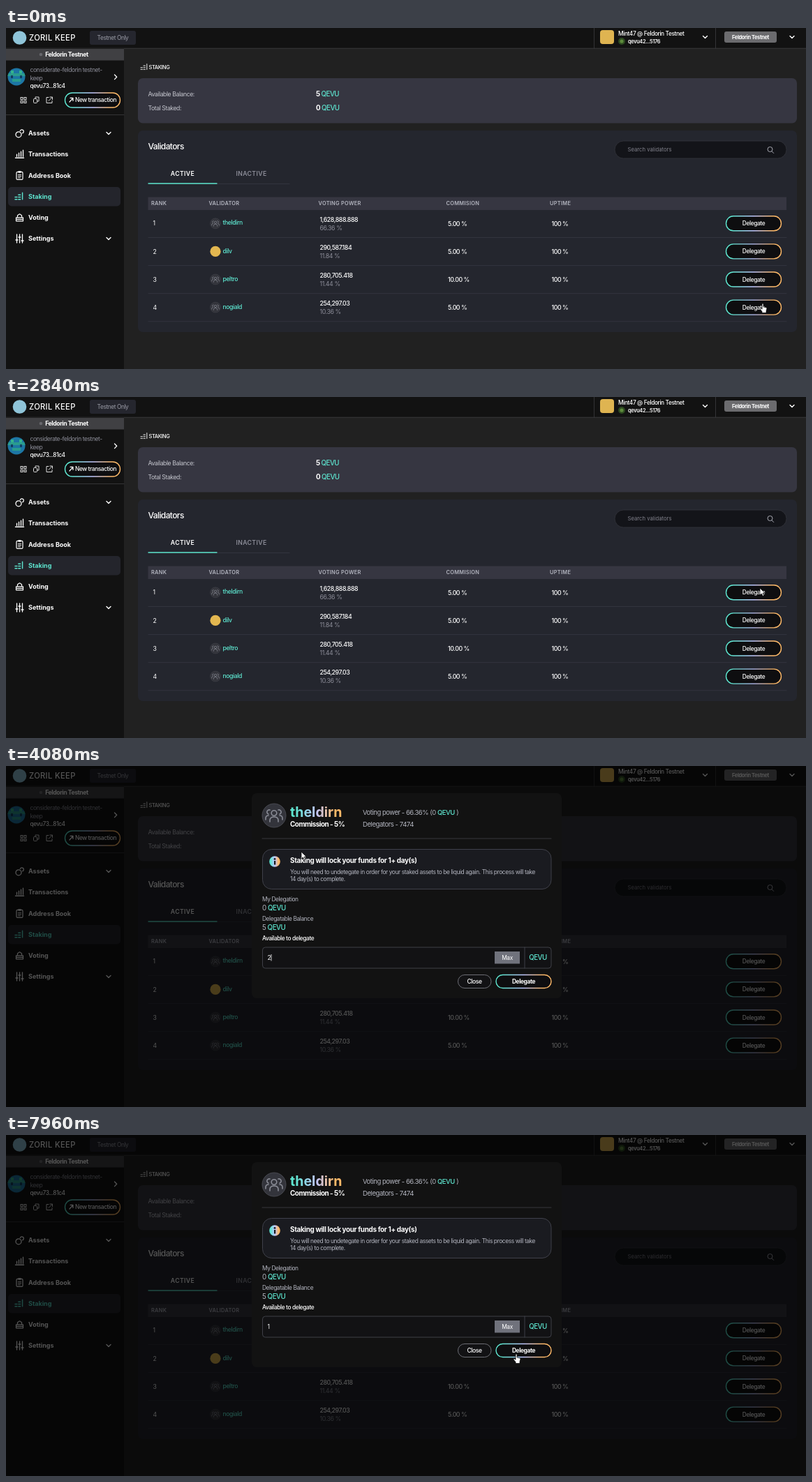
An HTML page for the animation above (8000 ms loop, 1146 px wide and 489 px high).

```html
<!DOCTYPE html>
<html lang="en">
<head>
<meta charset="utf-8">
<title>Staking</title>
<style>
  html, body { margin: 0; width: 100%; height: 100%; overflow: hidden; background: #121212; }
  svg { display: block; width: 1146px; height: 489px; font-family: Inter, sans-serif; }
</style>
</head>
<body>
<svg id="stage" viewBox="0 0 1146 489"></svg>
<script>
const TEAL = '#5ee6d0', GREY = '#8c8d98', SOFT = '#b4b6c0', PANEL = '#363641';
const NET = 'Feldorin Testnet', COIN = 'QEVU';
const stage = document.getElementById('stage');

// y is the middle of the capitals
const text = (x, y, size, str, { fill = '#fff', weight = 400, track = -.05, anchor = 'start' } = {}) =>
  `<text x="${x}" y="${y + size * .364}" font-size="${size}" fill="${fill}" font-weight="${weight}"
    letter-spacing="${track * size}" text-anchor="${anchor}">${str}</text>`;
const rect = (x, y, w, h, fill, r = 0, stroke = 'none', sw = 1) =>
  `<rect x="${x}" y="${y}" width="${w}" height="${h}" rx="${r}" fill="${fill}" stroke="${stroke}" stroke-width="${sw}"/>`;
const circle = (x, y, r, fill, stroke = 'none', sw = 1) =>
  `<circle cx="${x}" cy="${y}" r="${r}" fill="${fill}" stroke="${stroke}" stroke-width="${sw}"/>`;
const line = (d, stroke = '#fff', sw = 1) =>
  `<path d="${d}" fill="none" stroke="${stroke}" stroke-width="${sw}" stroke-linecap="round" stroke-linejoin="round"/>`;
const at = (x, y, body, scale = 1) => `<g transform="translate(${x} ${y}) scale(${scale})">${body}</g>`;
const teal = str => `<tspan fill="${TEAL}" font-weight="500">${str}</tspan>`;
const chevron = (x, y) => line(`M${x - 3} ${y - 1.5}l3 3l3-3`, '#fff', 1.4);
const pill = (x, y, w, h, label, weight) =>
  rect(x, y, w, h, '#0e0e10', h / 2, 'url(#brand)', 1.4) +
  text(x + w / 2, y + h / 2, 8.4, label, { weight, anchor: 'middle' });
const people = (x, y, scale) => at(x, y,
  circle(0, 0, 17, '#33343b', '#4d4e56', .9) +
  line('M-6 9v-2q0-5 6-5t6 5v2M-12 6v-2q0-4 4-4M12 6v-2q0-4-4-4', '#8b8d97', 1.6) +
  circle(0, -3.5, 3.8, 'none', '#8b8d97', 1.6) +
  line('M-6-8a3 3 0 1 0-2 6M6-8a3 3 0 1 1 2 6', '#8b8d97', 1.6), scale);
const bars = (x, y, color, scale) => at(x, y, line(
  'M-5 3.5h2.4M-5 .8h2.4M-1 3.5h2.4M-1 .8h2.4M-1-1.9h2.4M3.8 3.5v-8', color, 1.2), scale);

function topBar() {
  return rect(0, 0, 1146, 29, '#121212') + line('M0 29.2H1146M842.5 0V29M1016.5 0V29', '#3d3d40', .8) +
    circle(19.5, 14, 9.8, '#8fc4d8') +
    text(33, 14, 11.2, 'ZORIL KEEP', { weight: 500, track: .03 }) +
    rect(120, 4, 66, 20, '#25262e', 3) + text(153, 14, 8.4, 'Testnet Only', { fill: '#9a9ba6', anchor: 'middle' }) +
    rect(851, 3, 20, 20, '#dfb451', 4) +
    text(877, 7.5, 8.4, 'Mint47 @ ' + NET, { weight: 500 }) +
    circle(882, 19, 5, '#2d4a20') + circle(882, 19, 2.6, '#5d8b3c') +
    text(891, 19, 7.44, 'qevu42...5176', { weight: 600 }) +
    chevron(1001.5, 13) + rect(1029, 5, 75, 16, '#6b6b6e', 3) +
    text(1066.5, 13, 7.44, NET, { weight: 700, anchor: 'middle' }) + chevron(1126, 13);
}

function sidebar() {
  const icons = [
    circle(-1.5, 1.8, 4, 'none', '#fff', 1.3) + line('M.8-3.6a2.6 2.6 0 1 1 3.4 3.4', '#fff', 1.3),
    line('M-6 5H6M-4 3V0M-1 3V-2M2 3V-4M5 3V-6', '#fff', 1.4),
    rect(-4.5, -5, 9, 11, 'none', 1.5, '#fff', 1.2) + rect(-2, -6.3, 4, 2.6, '#fff') + line('M-2-1H2M-2 1.2H2M-2 3.4H1'),
    bars(-.5, 0, TEAL, 1.2),
    line('M-5 0h10v5h-10zM-3 0v-3l3-2l3 2v3M-5 2.5h10', '#fff', 1.2),
    line('M-4-6V6M0-6V6M4-6V6M-5.5 2h3M-1.5-2h3M2.5 3h3', '#fff', 1.3)
  ];
  const nav = ['Assets', 'Transactions', 'Address Book', 'Staking', 'Voting', 'Settings'].map((name, i) => {
    const y = 151 + 30.2 * i, active = i === 3;
    return (active ? rect(3, 228, 161, 27.5, '#24252c', 5) : '') + at(19.5, y, icons[i]) +
      text(32, y, 9, name, { weight: 700, track: 0, fill: active ? TEAL : '#fff' }) +
      (i % 5 ? '' : chevron(147, y));
  }).join('');
  return rect(0, 29.5, 169, 460, '#121212') + rect(0, 30, 169, 16.5, '#404043') +
    circle(50, 38, 2.3, '#67676c') + text(87, 38, 8.68, NET, { weight: 700, anchor: 'middle' }) +
    `<g clip-path="url(#avatar)">${rect(2, 57, 26, 26, '#1d76a4') + rect(2, 65, 26, 4, '#2a9c8e') +
      rect(7, 61, 4, 4, '#35b38c') + rect(19, 61, 4, 4, '#35b38c') +
      rect(9, 73, 12, 4, '#2a9c8e') + rect(7, 68, 3, 4, '#123f5f') + rect(20, 68, 3, 4, '#123f5f')}</g>` +
    text(34.5, 60, 8.5, 'considerate-feldorin testnet-', { fill: GREY }) +
    text(34.5, 72, 8.5, 'keep', { fill: GREY }) +
    text(34.5, 83, 8.3, 'qevu73...81c4', { weight: 500 }) + line('M155.5 67l3.2 3.3l-3.2 3.3', '#fff', 1.3) +
    [[21, 99.5], [26, 99.5], [21, 104.5], [26, 104.5]].map(p => rect(...p, 3, 3, 'none', 0, '#ddd')).join('') +
    rect(39.5, 101.5, 5, 6, 'none', 1, '#ddd') + line('M42 101V99h5v6h-2', '#ddd') +
    line('M61 99.5h-3v8h8v-3M63 99h3.5v3.5M66 99.5l-5 5', '#ddd') +
    rect(84.5, 93, 79, 21, '#0e0e10', 10.5, 'url(#brand)', 1.4) + line('M91 106l5-5.5M92 100.3h4v4.2', '#fff', 1.2) +
    text(99, 103.3, 8.4, 'New transaction', { weight: 500 }) +
    line('M0 124.5H169', '#3d3d40', .8) + nav;
}

function validators() {
  const head = { fill: SOFT, weight: 600, track: .035 };
  const columns = [[208, 'RANK'], [290.5, 'VALIDATOR'], [447.5, 'VOTING POWER'], [630.5, 'COMMISION'], [779, 'UPTIME']];
  const rows = [
    ['theldirn', '1,628,888.888', '66.36 %', '5.00 %'],
    ['dilv', '290,587.184', '11.84 %', '5.00 %'],
    ['peltro', '280,705.418', '11.44 %', '10.00 %'],
    ['nogiald', '254,297.03', '10.36 %', '5.00 %']
  ].map(([name, power, share, fee], i) => {
    const y = 280.3 + 40.1 * i;
    return text(210.5, y, 8.68, i + 1) + (i === 1 ? circle(300, y, 7.6, '#e3b750') : people(300, y, .44)) +
      text(310.5, y - 1, 8.68, name, { fill: TEAL, weight: 500 }) +
      text(449.5, y - 6, 8.8, power, { weight: 500 }) + text(449.5, y + 6.3, 8.8, share, { fill: GREY }) +
      text(633, y, 8.8, fee, { weight: 500 }) + text(781.5, y, 8.8, '100 %', { weight: 500 }) +
      pill(1031.5, y - 10.5, 79, 21, 'Delegate', 500) +
      line(`M204 ${y + 20.2}H1118`, '#363843', .8);
  }).join('');
  return rect(189, 147, 944, 289, '#24262e', 7) + text(203.5, 169.5, 12, 'Validators', { weight: 500 }) +
    rect(872, 162, 246, 25, '#131419', 12.5, '#34353d', .8) +
    text(890.5, 174.5, 7.7, 'Search validators', { fill: '#80818b', track: 0 }) +
    circle(1094.5, 174, 3.5, 'none', '#a6a7b0') + line('M1097 176.8l2.7 2.7', '#a6a7b0') +
    text(253, 208.5, 8.68, 'ACTIVE', { weight: 600, track: .045, anchor: 'middle' }) +
    text(351.5, 208.5, 8.68, 'INACTIVE', { weight: 600, track: .045, anchor: 'middle', fill: GREY }) +
    line('M302 223.5H406', '#363843', .8) + line('M204 223H302', TEAL, 1.4) +
    rect(203.5, 242.5, 914.5, 18.5, PANEL) + columns.map(([x, name]) => text(x, 251.5, 7.44, name, head)).join('') + rows;
}

function page() {
  const balance = (y, label, n) => text(203.5, y, 8.68, label, { fill: '#c4c5cd' }) +
    text(444, y, 9.8, `${n} ${teal(COIN)}`, { weight: 700 });
  return rect(0, 0, 1146, 489, '#212121') + topBar() + sidebar() +
    bars(198, 56, '#ccc', 1) + text(204.5, 56, 7.44, 'STAKING', { weight: 500 }) +
    rect(189, 72, 944, 64.5, PANEL, 7) +
    balance(94.5, 'Available Balance:', 5) + balance(114.5, 'Total Staked:', 0) + validators();
}

function dialog() {
  const info = { fill: SOFT };
  return people(384, 71, 1) + text(407, 65.8, 19.6, 'theldirn', { weight: 700, track: 0, fill: 'url(#brand)' }) +
    text(407, 83.3, 9.92, 'Commission - 5%', { weight: 700 }) +
    text(511, 66.5, 9.5, `Voting power - 66.36% (0 ${teal(COIN)} )`, info) +
    text(511, 83.3, 9.6, 'Delegators - 7474', info) + line('M367 104H781', '#3f4047', .8) +
    rect(367.5, 119.5, 413.5, 57, '#1a1b20', 13, '#454650', .9) +
    circle(385, 137, 7.8, 'url(#brand)') + rect(384, 136, 2.2, 5.5, '#17181c') + circle(385, 133.4, 1.4, '#17181c') +
    text(407, 135.7, 9.92, 'Staking will lock your funds for 1+ day(s)', { weight: 700, track: -.034 }) +
    text(407, 151.7, 8.42, 'You will need to undetegate in order for your staked assets to be liquid again. This process will take', info) +
    text(407, 161.5, 8.42, '14 day(s) to complete.', info) +
    text(367, 190.5, 8.4, 'My Delegation', info) + text(367, 203, 9.8, '0 ' + teal(COIN), info) +
    text(367, 219, 8.4, 'Delegatable Balance', info) + text(367, 231.3, 9.8, '5 ' + teal(COIN), info) +
    text(367, 247.3, 8.4, 'Available to delegate', { weight: 500 }) +
    rect(367.5, 260, 413.5, 30, '#121214', 4, '#45464d', .9) + line('M743 260V290', '#45464d', .9) +
    rect(700, 266, 36, 17.5, '#70727c') + text(718, 275, 8.4, 'Max', { anchor: 'middle' }) +
    text(762, 274.7, 9.8, COIN, { fill: TEAL, weight: 500, anchor: 'middle' }) +
    rect(647.5, 299.5, 47.5, 19, '#121214', 9.5, '#77787f', .9) +
    text(671, 309, 8.6, 'Close', { weight: 500, anchor: 'middle' }) + pill(702, 299.5, 79, 19, 'Delegate', 700);
}

const shape = (id, d) =>
  `<path id="${id}" d="${d}" fill="#fff" stroke="#000" stroke-width=".7" stroke-linejoin="round"/>`;
stage.innerHTML = `
  <defs>
    <linearGradient id="brand"><stop offset=".1" stop-color="#5ee6d0"/><stop offset=".5" stop-color="#bfc6ff"/>
      <stop offset=".85" stop-color="#ffba69"/></linearGradient>
    <clipPath id="avatar">${circle(15, 70, 12.5, '#fff')}</clipPath>
  </defs>
  ${page()}
  <g id="modal">${rect(0, 0, 1146, 489, 'rgba(0,0,0,.67)')}
    <rect id="card" x="352" y="39" width="444" rx="7" fill="#121212"/>
    <path id="spinner" fill="none" stroke="#b4b8c8" stroke-width="1.6"/>
    <g id="content">${dialog()}
      <rect id="selection" x="374.3" y="270" width="5.6" height="10" fill="#2f7de1"/>
      <text id="amount" x="374.5" y="278" font-size="8.6" fill="#fff"/>
      <path id="caret" d="M380 270v9.5" stroke="#fff" stroke-width=".8"/>
    </g>
  </g>
  <g id="pointer">
    ${shape('arrow', 'M0 0V10L2.4 7.9L4 11.5L5.7 10.7L4.1 7.2H7.3Z')}
    ${shape('hand', 'M-1 .5Q0-.6 1 .5V5L5 5.8Q6 6.2 5.9 7.4L5 11V13.5H-1V11.5L-4 8Q-4.2 6.5-2.7 6.8L-1 8.2Z')}
    <path id="beam" d="M-2.5-6.5H-.6L0-6L.6-6.5H2.5M0-6V6M-2.5 6.5H-.6L0 6L.6 6.5H2.5" fill="none" stroke="#ddd" stroke-width=".9"/>
  </g>`;
const el = Object.fromEntries([...stage.querySelectorAll('[id]')].map(e => [e.id, e]));
const show = (e, on) => { e.style.display = on ? '' : 'none'; };

// pointer path: time, x, y
const path = [
  [0, 1084, 395], [170, 1084, 395], [400, 1110, 370], [650, 1133, 310], [930, 1108, 266],
  [1150, 1075, 233], [1350, 1026, 262], [1550, 1060, 298], [1760, 1114, 266],
  [1950, 1098, 237], [2200, 1055, 258], [2400, 1075, 290], [2580, 1080, 274], [2840, 1080, 274],
  [2910, 1120, 285], [3470, 470, 140], [4080, 423, 123], [4340, 432, 264], [4700, 584, 272],
  [5090, 500, 276], [5290, 500, 276], [5700, 676, 304], [6050, 516, 274], [6180, 516, 274],
  [6390, 325, 274], [6590, 325, 274], [6790, 372, 278], [7280, 478, 296], [7480, 478, 296],
  [7960, 731, 314], [8000, 731, 314]
];
const rate = (i, k) => path[i] && path[i + 1] ? (path[i + 1][k] - path[i][k]) / (path[i + 1][0] - path[i][0]) : 0;
function slope(i, k) {
  const a = rate(i - 1, k), b = rate(i, k);
  return a * b > 0 ? 2 * a * b / (a + b) : 0;
}
function along(t, k) {
  const i = path.findIndex((p, n) => t < path[n + 1][0]);
  const [a, b] = [path[i], path[i + 1]], d = b[0] - a[0], u = (t - a[0]) / d, v = 1 - u;
  return v * v * (1 + 2 * u) * a[k] + u * u * (3 - 2 * u) * b[k] + d * u * v * (v * slope(i, k) - u * slope(i + 1, k));
}

const OPEN = 2900, LOADED = 3540, TYPED = 3960, SELECTED = 6320, RETYPED = 7080;
const inside = (x, y, l, t, r, b) => x > l && x < r && y > t && y < b;
function pointerKind(t, x, y) {
  if (t < 2600) return [0, 1, 2, 3].some(i => inside(x, y, 1031, 269 + 40 * i, 1111, 292 + 40 * i)) ? 'hand' : 'arrow';
  if (t < LOADED) return 'arrow';
  if (inside(x, y, 647, 299, 695, 319) || inside(x, y, 701, 299, 781, 319)) return 'hand';
  return inside(x, y, 373, 260, 696, 290) || t > 6180 && t < 6600 ? 'beam' : 'arrow';
}

function render(t) {
  const x = along(t, 1), y = along(t, 2), kind = pointerKind(t, x, y);
  el.pointer.setAttribute('transform', `translate(${x} ${y})`);
  for (const k of ['arrow', 'hand', 'beam']) show(el[k], k === kind);

  show(el.modal, t >= OPEN);
  show(el.content, t >= LOADED);
  show(el.spinner, t < LOADED);
  el.card.setAttribute('height', t < LOADED ? 123 : 294);
  const wait = Math.max(0, t - OPEN), from = .24 + wait * .0045, to = from + .08 + 4 * Math.min(1, wait / 700) ** 2;
  const dot = a => `${574 + 14.5 * Math.cos(a)} ${100 + 14.5 * Math.sin(a)}`;
  el.spinner.setAttribute('d', `M${dot(from)}A14.5 14.5 0 ${to - from > Math.PI ? 1 : 0} 1 ${dot(to)}`);

  el.amount.textContent = t < TYPED ? '' : t < RETYPED ? '2' : '1';
  const selecting = t >= SELECTED && t < RETYPED;
  show(el.selection, selecting);
  const typedAt = t < TYPED ? LOADED : t < RETYPED ? TYPED : RETYPED;
  show(el.caret, !selecting && Math.floor((t - typedAt) / 530) % 2 === 0);
  el.caret.setAttribute('transform', `translate(${t < TYPED ? -5.5 : 0} 0)`);
}

const start = performance.now();
(function tick() {
  render((performance.now() - start) % 8000);
  requestAnimationFrame(tick);
})();
</script>
</body>
</html>
```
